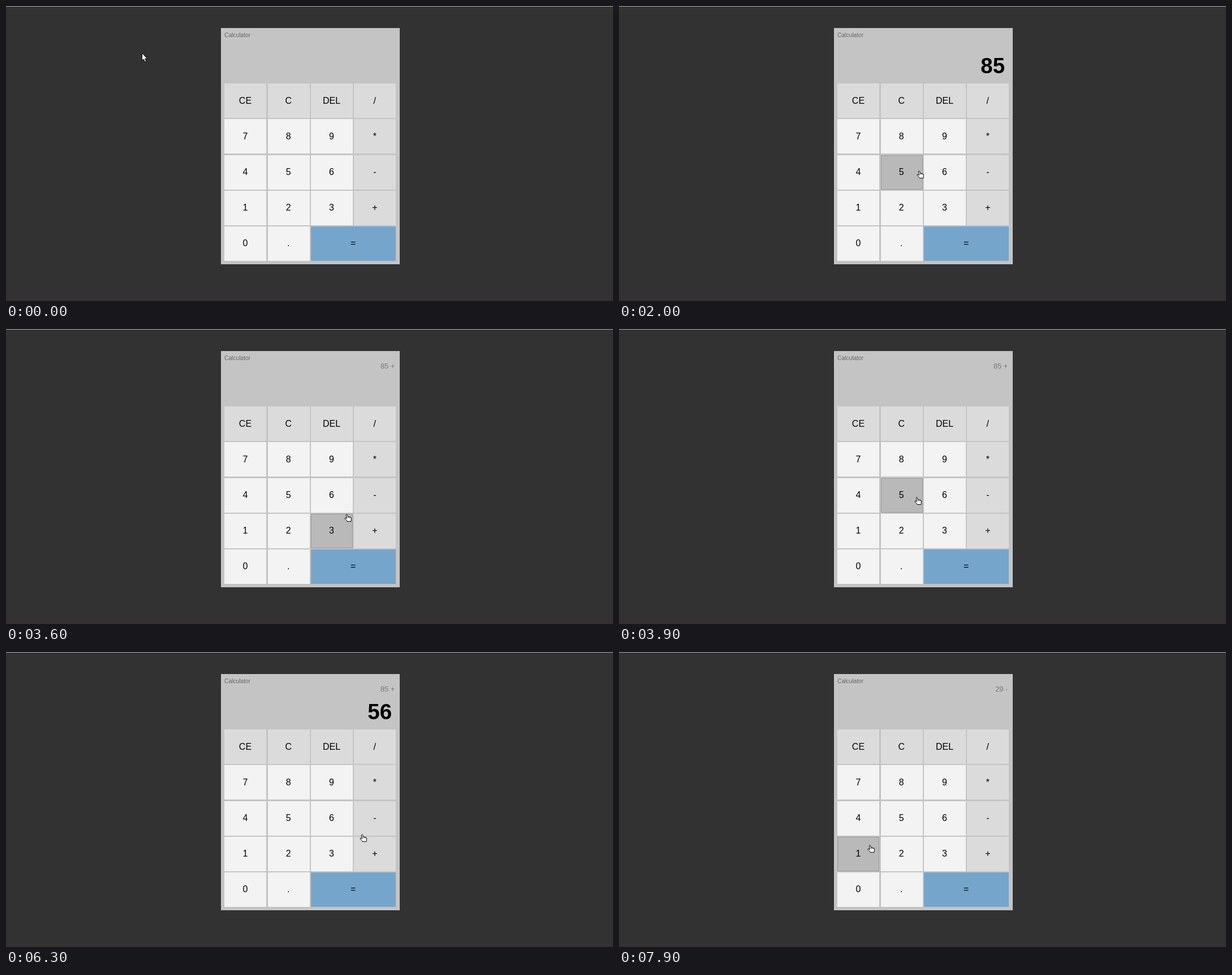
Recreate the animation shown at these times as an HTML page. Size 1073 px wide and 522 px high, loop 8 s.

```html
<!DOCTYPE html>
<html lang="en">
<head>
<meta charset="utf-8">
<title>Calculator</title>
<style>
html, body { margin: 0; width: 100%; height: 100%; overflow: hidden; background: #323232; }
svg { display: block; width: 1073px; height: 522px; }
text { font-family: "Liberation Sans", Arial, sans-serif; }
.key text { font-size: 16px; text-anchor: middle; }
.key.hover rect { fill: #b9b9b9; stroke: #999; }
</style>
</head>
<body>
<svg viewBox="0 0 1073 522">
  <rect width="1073" height="522" fill="#323232"/>
  <rect width="1073" height="1" fill="#b4b4b4"/>
  <rect y="518" width="1073" height="4" fill="#372f32"/>
  <rect x="380" y="39" width="316" height="418" fill="#c4c4c4"/>
  <text x="386" y="55" font-size="10.24" fill="#666">Calculator</text>
  <text id="past" x="687.2" y="70" font-size="12.8" text-anchor="end" fill="#777"></text>
  <text id="entry" x="682" y="118.7" font-size="38.4" font-weight="bold" text-anchor="end"></text>
  <g id="keys"></g>
  <g id="cursor" fill="#fff" stroke="#000" stroke-linejoin="round">
    <path id="arrow" stroke-width=".9" d="M.5 .5V13.6L3.4 10.9L5.5 15.8L7.7 14.9L5.7 10.1H9.6Z"/>
    <g id="hand">
      <path d="M3.2 1.6Q4.2 0 5.4 1.4L6.4 5L10.6 5.8Q12.5 6.2 12.5 8L12 13.5H5.2L4.6 12L1 8.7Q.5 7.2 2.2 7.2L4.5 8.5Z"/>
      <path fill="none" stroke-width=".6" d="M6.4 5V7.5M8.5 5.5V7.6M10.5 5.9V7.8"/>
    </g>
  </g>
</svg>
<script>
const LOOP = 8000, STEP = 100;
const LEFT = 386.3, TOP = 137.42, PITCH_X = 76.3, PITCH_Y = 63.05, KEY_W = 74.1, KEY_H = 61;
const $ = id => document.getElementById(id);
const keys = [];

function make(tag, attrs, parent) {
  const el = document.createElementNS("http://www.w3.org/2000/svg", tag);
  for (const name in attrs) el.setAttribute(name, attrs[name]);
  return parent.appendChild(el);
}

function addKey(label, row, col) {
  const equals = label === "=";
  const x = LEFT + col * PITCH_X, y = TOP + row * PITCH_Y;
  const w = KEY_W + (equals ? PITCH_X : 0);
  const [x0, y0, x1, y1] = [x, y, x + w, y + KEY_H].map(Math.round);
  const fill = equals ? "#76a5cc" : row === 0 || col === 3 ? "#dbdbdb" : "#f3f3f3";
  const el = make("g", { class: "key" }, $("keys"));
  make("rect", { x: x0 + .5, y: y0 + .5, width: x1 - x0 - 1, height: y1 - y0 - 1, fill, stroke: fill }, el);
  make("text", { x: x + w / 2 - .4, y: Math.floor(y + KEY_H / 2 + 5.4) }, el).textContent = label;
  keys.push({ el, x0, y0, x1, y1 });
}

["CE C DEL /", "7 8 9 *", "4 5 6 -", "1 2 3 +", "0 . ="].forEach((labels, row) =>
  labels.split(" ").forEach((label, col) => addKey(label, row, col)));

// Pointer moves: leave time, arrival time, x, y
const moves = [
  [0, 900, 503, 246], [1200, 1500, 507, 283], [1900, 2400, 602, 321],
  [2600, 2700, 648, 347], [3400, 3900, 522, 297], [4500, 4700, 573, 294],
  [5700, 5900, 620, 322], [6100, 6300, 625, 322], [6400, 6800, 639, 292],
  [7400, 7600, 519, 313], [7700, 7900, 439, 341]
];
const presses = [[1100, "8"], [1900, "5"], [3100, "+"], [4500, "5"], [5200, "6"], [7300, "-"]];

function pointerAt(t) {
  let x = 240, y = 83;
  for (const [leave, arrive, toX, toY] of moves) {
    const k = Math.min(1, Math.max(0, (t - leave) / (arrive - leave)));
    x += (toX - x) * k;
    y += (toY - y) * k;
  }
  return [Math.round(x), Math.round(y)];
}

// An operator key combines the stored total with the entry
function displayAt(t) {
  let total = null, entry = "", past = "";
  for (const [time, key] of presses) {
    if (time > t) break;
    if (key >= "0") {
      entry += key;
      continue;
    }
    const value = Number(entry);
    total = total === null ? value : key === "+" ? total + value : total - value;
    past = total + " " + key;
    entry = "";
  }
  return { entry, past };
}

function draw(time) {
  const t = Math.floor(time % LOOP / STEP) * STEP;
  const [x, y] = pointerAt(t), hotX = x + 4, hotY = y + 3;
  for (const { el, x0, y0, x1, y1 } of keys) {
    el.classList.toggle("hover", hotX >= x0 && hotX < x1 && hotY >= y0 && hotY < y1);
  }
  const { entry, past } = displayAt(t);
  $("entry").textContent = entry;
  $("past").textContent = past;
  const onPad = hotX >= LEFT && hotY >= TOP;
  $("cursor").setAttribute("transform", `translate(${x} ${y})`);
  $("hand").style.display = onPad ? "" : "none";
  $("arrow").style.display = onPad ? "none" : "";
}

const start = performance.now();
function tick() {
  draw(performance.now() - start);
  requestAnimationFrame(tick);
}
tick();
</script>
</body>
</html>
```
